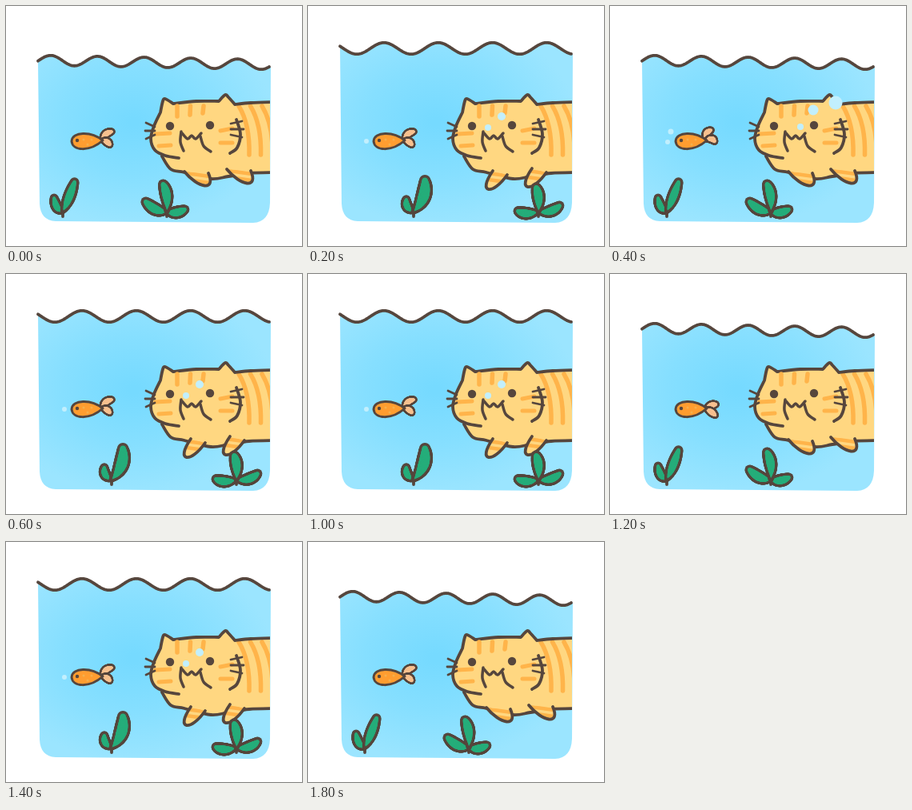
These frames come from a looping animation (370x300 px, 2 s). An HTML page with a canvas:

```html
<!DOCTYPE html>
<html lang="en">
<head>
<meta charset="utf-8">
<title>Cat in the fish tank</title>
<style>
html, body { margin: 0; width: 100%; height: 100%; overflow: hidden; background: #fff; }
canvas { display: block; }
</style>
</head>
<body>
<canvas id="stage" width="370" height="300"></canvas>
<script>
const ctx = document.getElementById('stage').getContext('2d');
const INK = '#56463d', FUR = '#ffd781', STRIPE = '#ffb44a';
const LEAF = '#25ad7a', FIN = '#f7c08f', BUBBLE = '#c2effd';
const BEAT = 200;

// One mood per beat
const SEQUENCE = ['rest', 'puff', 'burst', 'puff', 'burst', 'puff', 'flick', 'puff', 'puff', 'rest'];

const WAVES = {
  low: { crest: 56, period: 58.4, middle: 68, slope: 0.019, height: 6.2 },
  high: { crest: 95, period: 67.8, middle: 53, slope: 0, height: 7.2 }
};

// Two tail lobes, each a bend and a tip
const TAILS = {
  spread: [[123, 158, 133, 157], [127, 168, 130, 174]],
  curled: [[118, 157, 127, 155], [128, 163, 131, 170]],
  flat: [[126, 163, 133, 163], [126, 171, 132, 177]]
};

const BUBBLES = {
  puff: [[242, 138, 5], [225, 152, 4], [73, 169, 3]],
  burst: [[282, 121, 8.5], [254, 130, 6.5], [238, 151, 4], [76, 157, 3.5], [72, 170, 3]]
};

// Leaves relative to the root: bend, tip, thickness
const PLANTS = {
  low: [
    { x: 71, leaves: [[-9, -8, -11, -24, 7], [7, -20, 15, -44, 8]] },
    { x: 201, leaves: [[-14, -5, -27, -19, 8.5], [11, -2, 23, -9, 8], [2, -28, -5, -41, 8.5]] }
  ],
  high: [
    { x: 132, leaves: [[-11, -10, -9, -22, 7], [17, -22, 14, -46, 10]] },
    { x: 288, leaves: [[-16, -1, -26, -7, 8], [16, -3, 27, -14, 8], [2, -25, -3, -37, 8.5]] }
  ]
};

// Smooth line through points; continues the path when join is set.
function curve(pts, join = false) {
  const at = i => pts[Math.max(0, Math.min(pts.length - 1, i))];
  ctx[join ? 'lineTo' : 'moveTo'](...pts[0]);
  for (let i = 0; i < pts.length - 1; i++) {
    const [a, b, c, d] = [at(i - 1), at(i), at(i + 1), at(i + 2)];
    ctx.bezierCurveTo(b[0] + (c[0] - a[0]) / 6, b[1] + (c[1] - a[1]) / 6,
                      c[0] - (d[0] - b[0]) / 6, c[1] - (d[1] - b[1]) / 6, c[0], c[1]);
  }
}

function stroke(width = 3.8, color = INK) {
  ctx.lineWidth = width;
  ctx.strokeStyle = color;
  ctx.stroke();
}

function fill(color) {
  ctx.fillStyle = color;
  ctx.fill();
}

function line(pts, width, color) {
  ctx.beginPath();
  curve(pts);
  stroke(width, color);
}

function dot(x, y, r, color) {
  ctx.beginPath();
  ctx.arc(x, y, r, 0, Math.PI * 2);
  fill(color);
}

// Rounded leaf that swells along a quadratic spine
function leaf([x0, y0], [x1, y1], [x2, y2], radius, color, edge = 1.8) {
  for (const [grow, paint] of [[edge, INK], [-edge, color]]) {
    for (let t = 0; t <= 1; t += 0.025) {
      const s = 1 - t;
      const r = radius * Math.sin(Math.PI * (0.06 + 0.74 * t)) + grow;
      dot(s * s * x0 + 2 * s * t * x1 + t * t * x2,
          s * s * y0 + 2 * s * t * y1 + t * t * y2, Math.max(0, r), paint);
    }
  }
}

function drawWater(level) {
  const { crest, period, middle, slope, height } = WAVES[level];
  const surface = x => middle + slope * (x - crest) - height * Math.cos(2 * Math.PI * (x - crest) / period);
  const wave = () => {
    ctx.beginPath();
    for (let x = 40; x <= 329; x++) ctx.lineTo(x, surface(x));
  };

  wave();
  ctx.lineTo(331, surface(329));
  ctx.lineTo(330, 246);
  ctx.quadraticCurveTo(329, 270, 309, 271);
  ctx.lineTo(62, 269);
  ctx.quadraticCurveTo(43, 268, 42, 247);
  ctx.closePath();

  const glow = ctx.createRadialGradient(0, 0, 5, 0, 0, 130);
  glow.addColorStop(0, '#76daff');
  glow.addColorStop(0.5, '#86dfff');
  glow.addColorStop(1, '#9be5ff');
  ctx.save();
  ctx.translate(160, 145);
  ctx.scale(1.35, 1);
  fill(glow);
  ctx.restore();

  wave();
  stroke();
}

function drawFish(tail) {
  for (const [bx, by, tx, ty] of TAILS[tail]) leaf([119, 168], [bx, by], [tx, ty], 4.6, FIN, 1.4);
  ctx.beginPath();
  ctx.moveTo(121, 168);
  ctx.bezierCurveTo(106, 156, 83, 157, 82, 169);
  ctx.bezierCurveTo(83, 181, 104, 183, 121, 168);
  fill('#ff9d30');
  stroke(3);
  for (let i = 0; i < 3; i++) dot(97 + 5 * i, i === 1 ? 173 : 167, 1.5, '#f4b04c');
  dot(89, 168, 2.2, INK);
}

function drawBody() {
  const outline = [
    [[216, 190], [199, 187], [186, 180], [181, 166], [185, 150], [193, 133]],
    [[193, 133], [196, 119], [199, 116], [209, 122]],
    [[209, 122], [238, 119], [266, 119]],
    [[266, 119], [274, 111], [278, 114], [286, 123]],
    [[286, 123], [306, 121], [336, 120]]
  ];
  const belly = [[336, 208], [304, 209], [278, 213], [256, 216], [223, 208], [206, 204], [195, 188]];
  const trace = () => {
    ctx.beginPath();
    outline.forEach((part, i) => curve(part, i > 0));
  };

  trace();
  curve(belly, true);
  fill(FUR);

  for (let i = 0; i < 3; i++) {
    const x = 291 + 14.5 * i;
    ctx.beginPath();
    ctx.moveTo(x, 125);
    ctx.quadraticCurveTo(x + 14, 148, x + 13, 186);
    stroke(5.5, STRIPE);
  }

  trace();
  stroke();
  line(belly);
}

function drawLeg(high) {
  const trace = () => {
    ctx.beginPath();
    if (high) {
      ctx.moveTo(231, 206);
      ctx.bezierCurveTo(211, 235, 231, 237, 249, 211);
    } else {
      ctx.moveTo(223, 207);
      ctx.bezierCurveTo(240, 228, 263, 232, 253, 209);
    }
  };
  trace();
  fill(FUR);
  ctx.save();
  ctx.clip();
  for (const y of [208, 216]) line([[218, y], [262, y + 6]], 4.5, STRIPE);
  ctx.restore();
  trace();
  stroke();
}

function drawFace() {
  for (let i = 0; i < 3; i++) line([[214 + 16.5 * i, 125], [214 + 16 * i, 138 - 2 * i]], 5.5, STRIPE);
  for (let i = 0; i < 2; i++) {
    line([[187 + 4 * i, 160 + 15 * i], [205 + i, 159 + 15 * i]], 5, STRIPE);
    line([[268, 156 + 15 * i], [283, 153 + 18 * i]], 5, STRIPE);
  }

  line([[219, 157], [218, 170], [222, 181]], 3.5);
  line([[220, 159], [227, 166], [232, 162], [237, 166], [244, 159]], 3.5);
  line([[243, 163], [247, 175], [256, 182]], 3.5);
  line([[288, 142], [293, 160], [289, 177], [280, 184]]);

  for (let i = -1; i <= 1; i++) {
    line([[174 + Math.abs(i), 156 + 10 * i], [186, 156 + 5 * i]], 2.8);
    line([[281, 154 + 7 * i], [297 - 2 * Math.abs(i), 154 + 10 * i]], 2.8);
  }

  dot(205, 150, 5.2, INK);
  dot(255, 149, 5.2, INK);
}

function drawCat(high) {
  ctx.save();
  ctx.beginPath();
  ctx.rect(0, 0, 330, 300);
  ctx.clip();
  drawBody();
  drawLeg(high);
  ctx.translate(high ? 49 : 53, -3);
  drawLeg(high);
  ctx.restore();
  drawFace();
}

function drawPlant({ x, leaves }) {
  const y = 263;
  line([[x, y - 9], [x, y]]);
  for (const [bx, by, tx, ty, r] of leaves) leaf([x, y - 6], [x + bx, y + by], [x + tx, y + ty], r - 1.5, LEAF);
}

function draw(time) {
  const mood = SEQUENCE[Math.floor(time / BEAT) % SEQUENCE.length];
  const high = mood === 'puff';
  const level = high ? 'high' : 'low';
  const tail = { burst: 'curled', flick: 'flat' }[mood] || 'spread';
  ctx.fillStyle = '#fff';
  ctx.fillRect(0, 0, 370, 300);
  ctx.lineCap = ctx.lineJoin = 'round';
  drawWater(level);
  drawFish(tail);
  drawCat(high);
  PLANTS[level].forEach(drawPlant);
  for (const [x, y, r] of BUBBLES[mood] || []) dot(x, y, r, BUBBLE);
}

const start = performance.now();
function tick() {
  draw(performance.now() - start);
  requestAnimationFrame(tick);
}
tick();
</script>
</body>
</html>
```
